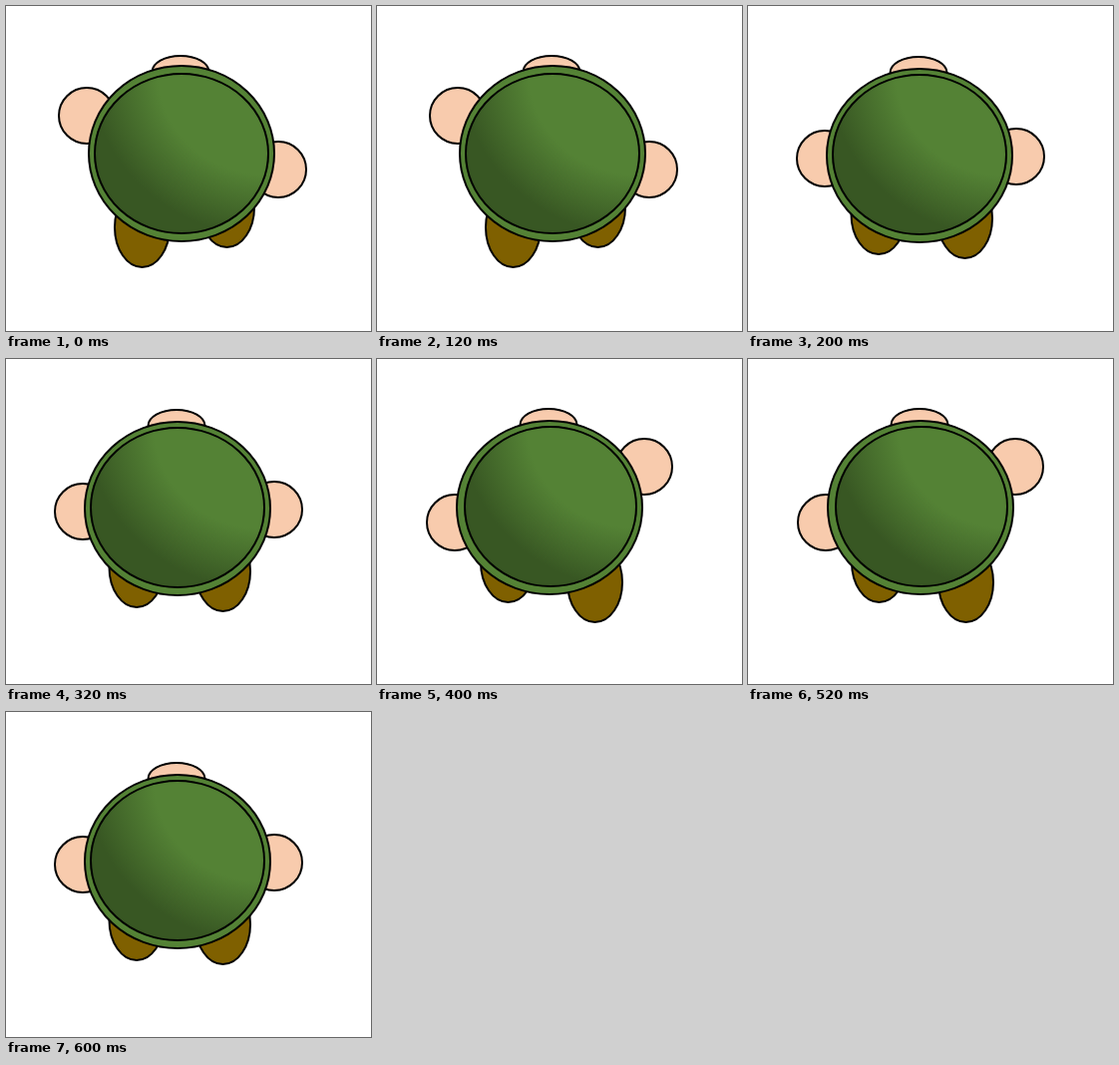
An HTML page for the animation above (800 ms loop, 366 by 326 pixels).

```html
<!DOCTYPE html>
<html lang="en">
<head>
<meta charset="utf-8">
<title>Walking turtle from behind</title>
<style>
  html, body { margin: 0; width: 100%; height: 100%; overflow: hidden; background: #fff; }
  svg { display: block; width: 366px; height: 326px; }
  ellipse { stroke: #000; stroke-width: 2; }
  .skin { fill: #f8cbad; }
  .shoe { fill: #7f6000; }
  .rim { fill: #548235; }
</style>
</head>
<body>
<svg viewBox="0 0 366 326">
  <defs>
    <radialGradient id="shade" cx="1" cy="0" r="1.06" fx="1" fy="0">
      <stop offset=".6" stop-color="#548235"/>
      <stop offset=".96" stop-color="#385723"/>
    </radialGradient>
  </defs>
  <ellipse id="head" class="skin" rx="28.5" ry="16"/>
  <ellipse id="handL" class="skin" rx="28" ry="28"/>
  <ellipse id="handR" class="skin" rx="28" ry="28"/>
  <ellipse id="footL" class="shoe" rx="27.5" ry="40"/>
  <ellipse id="footR" class="shoe" rx="27.5" ry="40"/>
  <ellipse id="rim" class="rim" rx="93" ry="87"/>
  <ellipse id="shell" fill="url(#shade)" rx="87" ry="80"/>
</svg>
<script>
  const STEP = 200;

  // Centre of every part, and the radii that vary between poses
  const stand = {
    head: [171, 67], handL: [77, 153], handR: [269, 151],
    footL: [131, 209], footR: [217.5, 213],
    rim: [172, 150, 93, 87], shell: [172, 149, 87, 80]
  };
  const leftStep = {
    head: [175, 66], handL: [81, 110], handR: [273, 164],
    footL: [136.5, 222], footR: [221.5, 202],
    rim: [176, 148, 93, 88], shell: [176, 148, 87, 80]
  };
  const rightStep = {
    head: [172, 66], handL: [78, 164], handR: [268, 108],
    footL: [131.5, 204], footR: [218.5, 224],
    rim: [173, 149, 93, 87], shell: [174, 148, 86, 80]
  };
  const walk = [leftStep, stand, rightStep, stand];

  function place(id, [x, y, rx, ry]) {
    const part = document.getElementById(id);
    part.setAttribute("cx", x);
    part.setAttribute("cy", y);
    if (rx) {
      part.setAttribute("rx", rx);
      part.setAttribute("ry", ry);
    }
  }

  function draw(ms) {
    const pose = walk[Math.floor(ms / STEP) % walk.length];
    for (const id in pose) place(id, pose[id]);
  }

  const start = performance.now();
  function tick() {
    draw(performance.now() - start);
    requestAnimationFrame(tick);
  }
  draw(0);
  requestAnimationFrame(tick);
</script>
</body>
</html>
```
